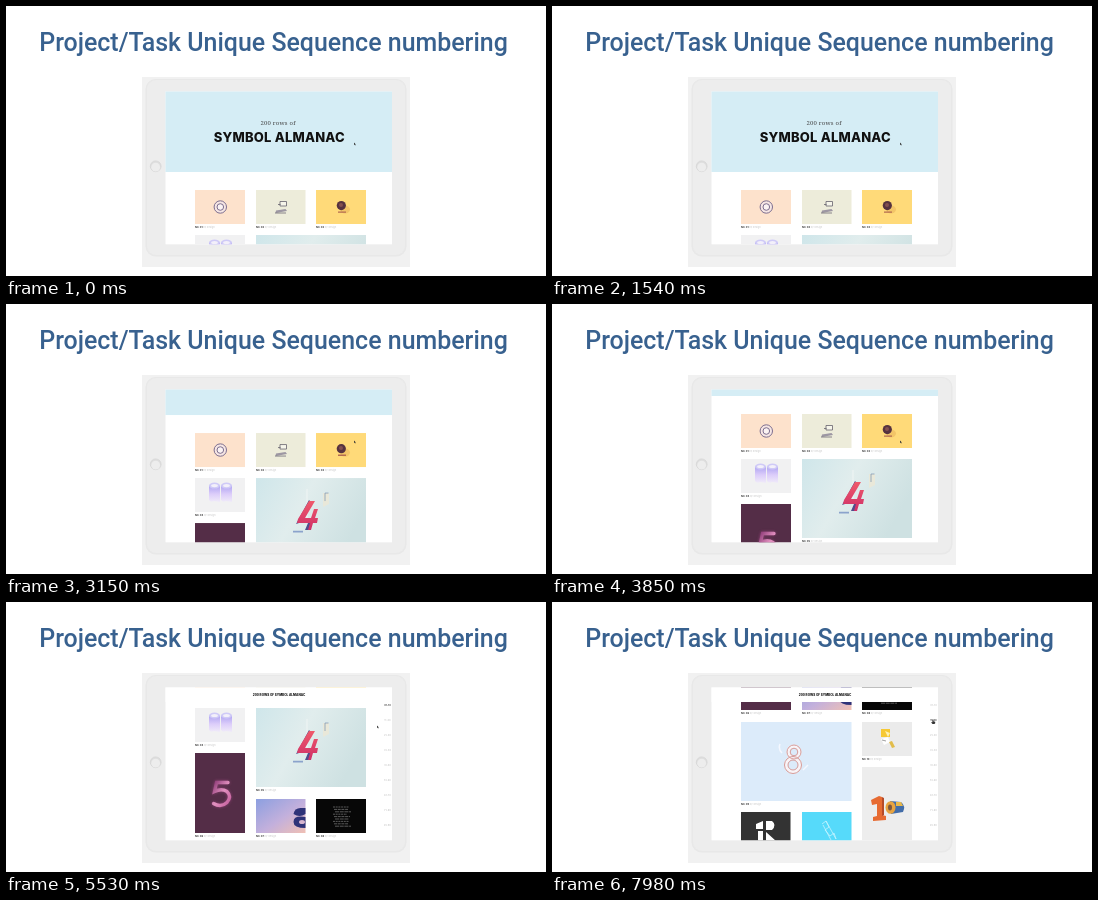
Write an HTML page that moves like this. It is 540 px wide and 270 px high and loops after 8 s.

```html
<!DOCTYPE html>
<html lang="en">
<head>
<meta charset="utf-8">
<title>Project/Task Unique Sequence numbering</title>
<style>
  html, body { margin: 0; width: 100%; height: 100%; overflow: hidden; background: #fff; }
  svg { display: block; width: 540px; height: 270px; }
  .title { font: 500 24.95px Roboto, sans-serif; fill: #38618f; }
  .sub { font: 6px "Noto Serif", "Liberation Serif", serif; fill: #444; }
  .hero { font: 800 13px Inter, sans-serif; letter-spacing: .2px; fill: #111; }
  .bar { font: 800 3.1px Inter, sans-serif; fill: #111; }
  .cap { font: 2.5px Inter, sans-serif; fill: #c4c4c4; }
  .cap tspan { font-weight: 700; fill: #333; }
  .nav { font: 600 2.5px Inter, sans-serif; fill: #ccc; }
  .nav .on { fill: #333; }
</style>
</head>
<body>
<svg viewBox="0 0 540 270">
  <defs>
    <clipPath id="screen"><rect x="159.5" y="85.5" width="226.5" height="152.8"/></clipPath>
    <linearGradient id="lilac" x2="0" y2="1">
      <stop stop-color="#b1a6f2"/><stop offset=".5" stop-color="#dccdfa"/><stop offset="1" stop-color="#f0ebf9"/>
    </linearGradient>
    <linearGradient id="mint" x2="1" y2=".4">
      <stop stop-color="#cfe6ea"/><stop offset=".47" stop-color="#e1eded"/><stop offset="1" stop-color="#cee1e2"/>
    </linearGradient>
    <linearGradient id="dusk" x2="1" y2="1">
      <stop stop-color="#8c9fe0"/><stop offset=".55" stop-color="#c3b0dc"/><stop offset="1" stop-color="#f0c0b4"/>
    </linearGradient>
    <linearGradient id="neon" x2="1" y2="1">
      <stop stop-color="#8f3c78"/><stop offset=".5" stop-color="#e291c0"/><stop offset="1" stop-color="#c45d9c"/>
    </linearGradient>
    <linearGradient id="coral" x2="0" y2="1">
      <stop stop-color="#ef5a6b"/><stop offset="1" stop-color="#cf2f68"/>
    </linearGradient>
    <filter id="glow" x="-50%" y="-50%" width="200%" height="200%"><feGaussianBlur stdDeviation="1.6"/></filter>
  </defs>

  <text class="title" x="267.5" y="45" text-anchor="middle">Project/Task Unique Sequence numbering</text>

  <rect x="136" y="71" width="268" height="190" fill="#f1f1f1"/>
  <rect x="139.5" y="73" width="261" height="177.5" rx="10" fill="#e8e8e8"/>
  <rect x="141" y="74" width="258" height="175" rx="9" fill="#ededed"/>
  <circle cx="149.7" cy="160.3" r="5.4" fill="#dedede" stroke="#d3d3d3" stroke-width=".7"/>
  <circle cx="149.7" cy="161.2" r="4.4" fill="#ededed"/>
  <rect x="159.5" y="85.5" width="226.5" height="152.8" fill="#fff"/>

  <g clip-path="url(#screen)">
    <g id="page">
      <rect x="159" y="80" width="228" height="86" fill="#d5edf5"/>
      <text class="sub" x="272" y="119" text-anchor="middle" letter-spacing=".2">200 rows of</text>
      <text class="hero" x="273.3" y="136.2" text-anchor="middle">SYMBOL ALMANAC</text>
    </g>
    <g id="fixed">
      <rect x="159" y="85" width="228" height="15" fill="#fff"/>
      <text class="bar" x="273" y="94.2" text-anchor="middle">200 ROWS OF SYMBOL ALMANAC</text>
      <g id="nav" class="nav"></g>
    </g>
    <g id="cursor">
      <path id="arrow" d="M0 0 1.9 1.9 1.2 2 1.5 2.8 1 3 .6 2.1 0 2.6Z" fill="#333"/>
      <path id="hand" d="M-.6-1h1V.8l1.8.4v1.6L1.4 3.600H-.5L-1.8 2l.6-.6.6.4Z" fill="#333"/>
    </g>
  </g>
</svg>
<script>
const LOOP = 8000, STEP = 70;
const $ = id => document.getElementById(id);

// x, y, width, height, background, artwork
const tiles = [
  [189, 184, 50, 34, '#fde2cc', `<g fill="none" stroke="#7c6d8e"><circle cx="214.3" cy="201" r="6.2" fill="#f6e6e4"/>
    <circle cx="214.3" cy="201" r="3.3" fill="#fbf3f3"/></g>`],
  [250, 184, 49.5, 34, '#edecda', `<path d="M274 195.5h6.5v4.5h-6.5zM272 198.5h2.500" fill="#f6f5ea" stroke="#66626e" stroke-width=".8"/>
    <path d="M270 204.5l9.5-1.5 1.5 2-11.5 2z" fill="#9d97a3"/><path d="M269 207h11" stroke="#6c6875" stroke-width=".8"/>`],
  [310, 184, 50, 34, '#ffda79', `<ellipse cx="339" cy="203.5" rx="5" ry="4" fill="#f3c568"/><circle cx="335.3" cy="199.6" r="4.6" fill="#56323f"/>
    <circle cx="335" cy="199" r="2" fill="#84504f"/><path d="M332 206.2h8" stroke="#b36c50" stroke-width="1.3"/>`],
  [189, 229, 50, 34, '#f1f1f2', [203, 215].map(x => `<path d="M${x} 237v14q2 3 5 1l6 1v-16z" fill="url(#lilac)"/>
    <ellipse cx="${x + 5.5}" cy="236.5" rx="5.5" ry="3" fill="#cfcaf7"/><ellipse cx="${x + 5.5}" cy="236.5" rx="3.4" ry="1.6" fill="#f3f0fa"/>`).join('')],
  [250, 229, 110, 79, 'url(#mint)', `<path d="M301 240v32" stroke="#f0f5f4"/>
    <path d="M317 244h6v11l-6 3z" fill="#e9e8d9"/><path d="M319 252v-8h3.5" fill="none" stroke="#7791b0" stroke-width=".7"/>
    <path d="M303 251l2 2-9 20-6 2zM299 281l3-7h3l-2 7z" fill="#504b8c"/>
    <path d="M302 281l2-7h-13l1-4 11-18h6l-10 17h6l3-9h4l-3 9h3l-1 5h-4l-2 7z" fill="url(#coral)"/>
    <path d="M287 282.6h10" stroke="#8ba3cc" stroke-width="1.8"/>`],
  [189, 274, 50, 80, '#542d47', ['#a94b89" filter="url(#glow)" opacity=".7', 'url(#neon)'].map(c =>
    `<path d="M222 303.5h-11.500l-2 9q7-3.500 12.500 0 5 5 0 11-6 5.500-13.500 1" fill="none" stroke-width="3.3" stroke-linecap="round" stroke="${c}"/>`).join('')],
  [250, 320, 49.5, 34, 'url(#dusk)', `<path d="M299.5 329h-5q-6 0-7 6 6 4 12 0z" fill="#2e3379"/>
    <path d="M299.5 338q-12-2-12 5 0 6 12 6z" fill="#2e3379"/><ellipse cx="296" cy="343" rx="3" ry="2" fill="#d7b5cf"/>`],
  [310, 320, 50, 34, '#070707', [...Array(9)].map((_, i) =>
    `<path d="M${327 + i % 3} ${328 + i * 2.4}h${16 - i % 2 * 2}" stroke="#aaa" stroke-width=".5" stroke-dasharray="${2 + i % 3} .7"/>`).join('')],
  [189, 366, 110.5, 79, '#dcebfa', `<g fill="none"><g stroke="#f8f4f8" stroke-width="4"><circle cx="242" cy="396" r="5.5"/><circle cx="241" cy="409" r="7"/></g>
    <g stroke="#d59b98"><circle cx="242" cy="396" r="7"/><circle cx="242" cy="396" r="3.8"/>
    <circle cx="241" cy="409" r="8.5"/><circle cx="241" cy="409" r="5"/></g>
    <path d="M228 388q-2 5 2 9M251 414l5-5" stroke="#f5f8ff" stroke-width="1.5"/></g>`],
  [310, 366, 50, 34, '#ebebeb', `<path d="M329 373h9v8h-9z" fill="#f6c936"/><path d="M333 375l5 2-2 4z" fill="#fff2b5"/>
    <path d="M329 383l7-2 2 5-6 3z" fill="#fff"/><path d="M337 386l3 6 3-1-3-6z" fill="#e2bd4b"/><path d="M330 384l4 1" stroke="#777" stroke-width=".7"/>`],
  [310, 411, 50, 80, '#ededed', `<path d="M319 444l8-4 3 1v18l4 1v4l-13 1v-4l4-1v-12l-5 1z" fill="#e76b32"/><path d="M330 441l2 1v17l-2 1z" fill="#b64b28"/>
    <path d="M338 445l11 1q5 4 2 10l-12 2z" fill="#426ca8"/><ellipse cx="338.5" cy="451.5" rx="5" ry="6.3" fill="#e8a33f"/><ellipse cx="338" cy="451.5" rx="2" ry="3" fill="#7b5640"/>
    <path d="M344 446h5l2 4h-7z" fill="#e8b84b"/>`],
  [189, 456, 49.5, 34, '#333', `<path d="M204 468l7-3v8h-7zM206 475h5v10h-5zM214 465h6q5 4 0 9h-6zM214 476l10 9h-10z" fill="#fff"/>`],
  [250, 456, 49.5, 34, '#56dafa', `<path d="M270 468l4-3 3 6-4 3 5 6 4-3 2 6M274 465l10 18M271 469l8 15" fill="none" stroke="#c5f4ff" stroke-width=".8"/>`]
];

$('page').innerHTML += tiles.map(([x, y, w, h, fill, art], i) => `
  <rect x="${x}" y="${y}" width="${w}" height="${h}" fill="${fill}"/>${art}
  <text class="cap" x="${x}" y="${y + h + 3.9}"><tspan>No. ${String(i + 1).padStart(2, '0')}</tspan> by design</text>`).join('');

$('nav').innerHTML = [...Array(9)].map((_, i) =>
  `<text x="381.5" y="${104 + i * 15}" text-anchor="middle">${i ? i : '0'}1-${i + 1}0</text>`).join('');
const labels = [...$('nav').children];

// time, value, exponent of the segment that ends here
const scroll = [[0, 0], [1680, 0], [2380, 34, 1], [3850, 74, 1], [4900, 123, .85], [7560, 123], [7980, 246, 1.5]];
const cursorX = [[0, 348], [5060, 348], [5530, 371], [5880, 381]];
const cursorY = [[0, 136.5], [5060, 136.5], [5530, 123.5], [5880, 118.5]];
const fade = [[0, 0], [4060, 0], [4270, 1]];

function at(track, t) {
  const i = track.findIndex(k => k[0] > t);
  if (i < 0) return track[track.length - 1][1];
  const [t0, v0] = track[i - 1], [t1, v1, power = 1] = track[i];
  return v0 + (v1 - v0) * ((t - t0) / (t1 - t0)) ** power;
}

function draw(now) {
  const t = Math.floor(now % LOOP / STEP) * STEP;
  const jumping = t >= 7630;
  $('page').setAttribute('transform', `translate(0 ${-at(scroll, t)})`);
  $('cursor').setAttribute('transform', `translate(${at(cursorX, t)} ${at(cursorY, t)})`);
  $('fixed').setAttribute('opacity', at(fade, t));
  $('arrow').style.display = jumping ? 'none' : '';
  $('hand').style.display = jumping ? '' : 'none';
  labels.forEach((label, i) => label.classList.toggle('on', i === (jumping ? 1 : 0)));
}

function tick() {
  draw(performance.now());
  requestAnimationFrame(tick);
}
draw(0);
requestAnimationFrame(tick);
</script>
</body>
</html>
```
